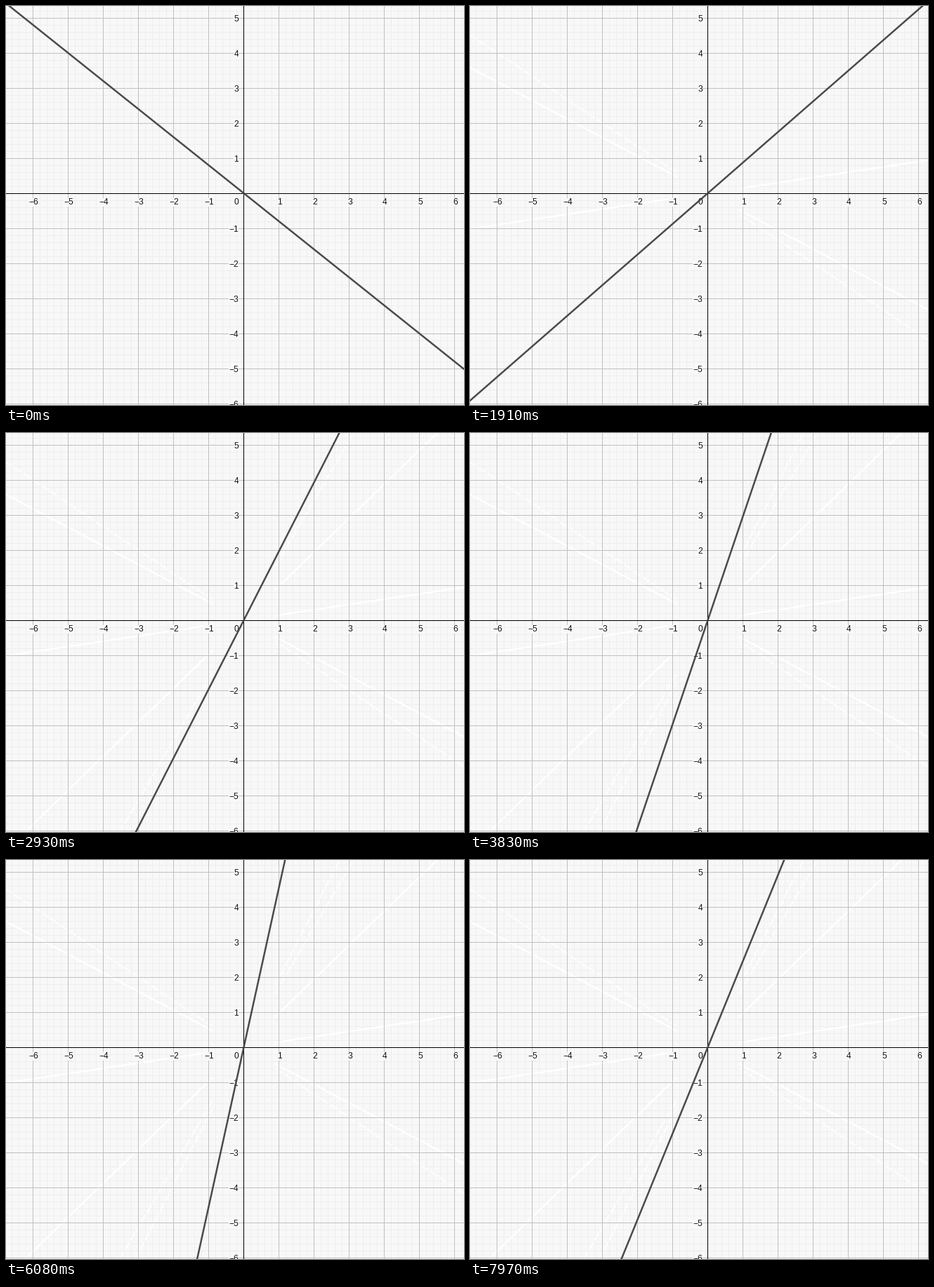
These frames come from a looping animation (652x569 px, 8000 ms). A matplotlib script:

```python
import matplotlib.pyplot as plt
import numpy as np
from matplotlib.animation import FuncAnimation
from matplotlib.collections import LineCollection

W, H, DPI = 652, 569, 64
PX = 72 / DPI            # one pixel in points
OX, OY, UNIT = 338.5, 267.5, 50
LINE_Y = 267.0
BG = "#f8f8f8"

LOOP, INTERVAL = 8000, 20
HOLD, TICK = 500, 30     # still time at the start, then one step per tick

# The slope runs up from START, turns at TOP and comes back down.
START, TOP = -0.8, 5.0
TICKS = (0, 22, 54, 82, 250)
TRAVEL = (0, 0.78, 1.88, 2.765, 8.343)

# Slopes of the pale traces the line leaves behind
STRONG_TRACES = (-0.53, 0.15, 0.97)
FAINT_TRACES = (-0.667, 1.71, 1.96)
TRACE_GAP = 45           # traces stay clear of the origin

fig = plt.figure(figsize=(W / DPI, H / DPI), dpi=DPI, facecolor=BG)
ax = fig.add_axes([0, 0, 1, 1])
ax.set(xlim=(0, W), ylim=(H, 0))
ax.axis("off")


def grid(xs, ys, color, zorder):
    rows = [[(0, y), (W, y)] for y in ys]
    cols = [[(x, 0), (x, H)] for x in xs]
    # Snapping would push lines centred on a pixel over to the next one.
    ax.add_collection(LineCollection(rows + cols, colors=color, linewidths=PX,
                                     zorder=zorder, snap=False))


def label(x, baseline, value, align):
    ax.text(x, baseline, str(value).replace("-", "\u2212"), ha=align,
            va="baseline", family="Liberation Sans", fontsize=12 * PX,
            color="#111111", zorder=3,
            bbox=dict(fc=BG, ec="none", pad=0.5))


def line_points(slope, reach=700):
    dx = reach / np.hypot(1, slope)
    return [OX - dx, OX + dx], [LINE_Y + slope * dx, LINE_Y - slope * dx]


def trace(slope, opacity, style):
    (x0, x1), (y0, y1) = line_points(slope)
    gap = TRACE_GAP
    xs = [x0, OX - gap, np.nan, OX + gap, x1]
    ys = [y0, LINE_Y + slope * gap, np.nan, LINE_Y - slope * gap, y1]
    artist, = ax.plot(xs, ys, color="white", lw=2.4 * PX, alpha=opacity,
                      ls=style, zorder=1, visible=False)
    return slope - START, artist


grid(np.arange(8.5, W, 10), np.arange(7.5, H, 10), "#eeeeee", 0)
grid(np.arange(38.5, W, UNIT), np.arange(17.5, H, UNIT), "#c0c0c0", 2)
grid([OX], [OY], "black", 4)

for k in range(-6, 7):
    if k:
        label(OX + k * UNIT + 1, 283, k, "center")
        if k < 6:
            label(331, OY - k * UNIT + 4.5, k, "right")
label(327.5, 283, 0, "center")

traces = [trace(s, 1.0, "-") for s in STRONG_TRACES]
traces += [trace(s, 0.8, (0, (5, 1.5))) for s in FAINT_TRACES]
line, = ax.plot([], [], color="#404040", alpha=0.94, lw=2.5 * PX, zorder=5)


def update(i):
    t = (i + 0.5) * INTERVAL
    tick = 0 if t < HOLD else (t - HOLD) // TICK + 1
    travel = np.interp(tick, TICKS, TRAVEL)
    line.set_data(*line_points(TOP - abs(TOP - START - travel)))
    for reached, artist in traces:
        artist.set_visible(travel >= reached)
    return [line] + [artist for _, artist in traces]


anim = FuncAnimation(fig, update, frames=LOOP // INTERVAL, interval=INTERVAL,
                     repeat=True, repeat_delay=0, blit=False)
plt.show()
```
